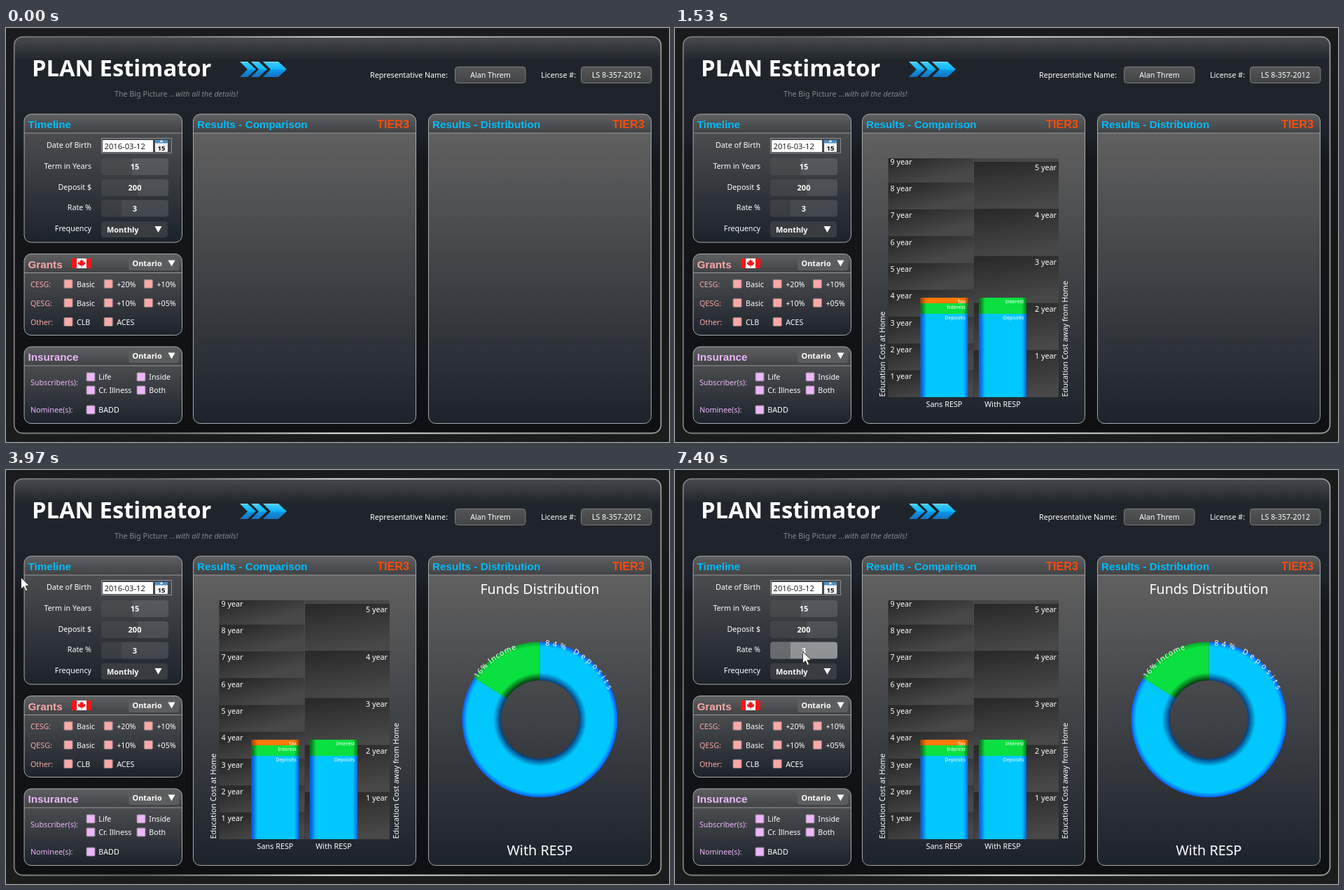
These frames come from a looping animation (947 by 591 pixels, 8 s). An HTML page with a canvas:

```html
<!DOCTYPE html>
<html lang="en">
<head>
<meta charset="utf-8">
<title>Plan estimator</title>
<style>
html, body { margin: 0; width: 100%; height: 100%; overflow: hidden; background: #191b1c; }
canvas { display: block; }
</style>
</head>
<body>
<canvas id="stage" width="947" height="591"></canvas>
<script>
const W = 947, H = 591, LOOP = 8000;
const SANS = '"Noto Sans", "Open Sans", sans-serif';
const HEAD = '"Liberation Sans", Arial, sans-serif';
const BLUE = '#00c8ff', GREEN = '#0ae040', ORANGE = '#ff7a00';
const PINK = '#fba8a8', LILAC = '#ecb6fb', CYAN = '#00bdfb';
let c;

const clamp = v => Math.max(0, Math.min(1, v));
const smooth = u => (u = clamp(u), u * u * (3 - 2 * u));
const lerp = (a, b, u) => a + (b - a) * u;
// The picture advances in short steps counted from a start time.
const held = (t, start, step) => start + Math.floor((t - start) / step) * step;

function layer(draw) {
  const canvas = document.createElement('canvas');
  canvas.width = W;
  canvas.height = H;
  c = canvas.getContext('2d');
  draw();
  return canvas;
}

function fade(gradient, stops) {
  stops.forEach(([at, color]) => gradient.addColorStop(at, color));
  return gradient;
}
const down = (y0, y1, ...stops) => fade(c.createLinearGradient(0, y0, 0, y1), stops);
const across = (x0, x1, ...stops) => fade(c.createLinearGradient(x0, 0, x1, 0), stops);

function text(str, x, y, { size = 10.7, color = '#fff', align = 'left', style = '', family = SANS } = {}) {
  c.font = `${style} ${size}px ${family}`;
  c.fillStyle = color;
  c.textAlign = align;
  c.fillText(str, x, y);
}

function box(x, y, w, h, fill, radius = 0, stroke, width = 1) {
  c.beginPath();
  c.roundRect(x, y, w, h, radius);
  if (fill) { c.fillStyle = fill; c.fill(); }
  if (stroke) { c.strokeStyle = stroke; c.lineWidth = width; c.stroke(); }
}

function poly(points, fill) {
  c.beginPath();
  points.forEach(([x, y]) => c.lineTo(x, y));
  c.closePath();
  c.fillStyle = fill;
  c.fill();
}

function panel(x, y, w, h, title, color, top = '#4a4c4f') {
  const split = y + 27;
  box(x, y, w, h, down(split, y + h, [0, top], [1, '#1d232b']), 10);
  c.save();
  c.clip();
  c.fillStyle = down(y, split, [0, '#5f6061'], [1, '#404244']);
  c.fillRect(x, y, w, 27);
  c.fillStyle = '#9a9a9a';
  c.fillRect(x, split - .5, w, 1);
  c.restore();
  box(x, y, w, h, null, 10, '#a9abac');
  text(title, x + 5.5, y + 20, { size: 15.25, color, style: 'bold', family: HEAD });
}

function dropdown(x, y, w, h, label, fill, labelX, arrowX) {
  box(x, y, w, h, fill, 4);
  const mid = y + h / 2;
  text(label, labelX, mid + 4, { style: 'bold', size: 10.9 });
  poly([[arrowX, mid - 4.5], [arrowX + 10, mid - 4.5], [arrowX + 5, mid + 4.5]], '#fff');
}

function check(x, y, label, color, gap = 18) {
  box(x, y, 12, 12, color, 1, '#8d8082');
  text(label, x + gap, y + 10.3);
}

function chevrons() {
  const fill = down(48, 70, [0, '#7fd8f7'], [.12, '#35c8fb'], [.5, '#10b4f5'], [.55, '#0a96e8'], [1, '#1a70bd']);
  [[334, 11], [350, 11], [367, 22]].forEach(([x, w]) =>
    poly([[x, 48], [x + w, 48], [x + w + 12, 59], [x + w, 70], [x, 70], [x + 11, 59]], fill));
}

function flag() {
  box(94, 329, 28, 14, '#f4161b');
  box(101, 329, 14, 14, '#fff');
  const half = [[0, -6], [1.4, -3.5], [3, -4], [2.6, -1], [5, -2], [5.4, .4], [2.4, 3], [.5, 3], [.5, 5.5]];
  const place = side => ([x, y]) => [108 + side * x, 336 + y];
  poly([...half.map(place(1)), ...half.map(place(-1)).reverse()], '#f4161b');
}

function drawPage() {
  c.fillStyle = down(0, H, [0, '#1a1b1c'], [.5, '#151617'], [1, '#1b1d1d']);
  c.fillRect(0, 0, W, H);
  box(11.7, 12.7, 923.8, 565.8,
    down(13, 579, [0, '#474a4d'], [.06, '#20252b'], [.24, '#1d222a'], [.31, '#15181c'], [1, '#0f1012']), 12,
    across(12, 936, [0, '#7c7e80'], [.2, '#6a6c6e'], [.5, '#f0f0f0'], [.75, '#b4b5b6'], [1, '#97999a']), 1.8);

  text('PLAN Estimator', 37, 69, { size: 32.7, style: 'bold' });
  chevrons();
  text('The Big Picture', 155, 98, { color: '#85888b' });
  text('...with all the details!', 234, 98, { color: '#85888b', style: 'italic' });
  text('Representative Name:', 631, 71, { align: 'right' });
  text('License #:', 814, 71, { align: 'right' });
  [[641.5, 'Alan Threm'], [821.5, 'LS 8-357-2012']].forEach(([x, label]) => {
    box(x, 55.5, 100.5, 23, down(55, 79, [0, '#555657'], [1, '#414344']), 4, '#7c7e7f');
    text(label, x + 50.5, 71, { align: 'center' });
  });

  panel(26, 123, 225.5, 183, 'Timeline', CYAN);
  ['Date of Birth', 'Term in Years', 'Deposit $', 'Rate %', 'Frequency'].forEach((label, i) =>
    text(label, 122, 171 + i * 29.75, { align: 'right' }));
  box(136.5, 157.5, 100, 21, null, 0, '#8e9193');
  box(138, 160, 72, 17, '#fff');
  text('2016-03-12', 140.5, 173, { size: 11.2, color: '#222' });
  box(213, 160, 18, 17, '#f4f4f4', 1);
  box(213, 160, 18, 4.5, '#4d8fc4', 1);
  box(220.5, 160.5, 3, 2.5, '#fff');
  text('15', 222, 174.5, { size: 9.5, color: '#111', style: 'bold', align: 'center' });
  dropdown(136, 276, 95, 23, 'Monthly', '#393c40', 144, 212.5);

  panel(26, 322.5, 225.5, 116, 'Grants', PINK);
  flag();
  dropdown(175, 326, 72, 20, 'Ontario', '#5c5d5e', 180.5, 231.5);
  const grants = [['CESG:', 'Basic', '+20%', '+10%'], ['QESG:', 'Basic', '+10%', '+05%'], ['Other:', 'CLB', 'ACES']];
  grants.forEach(([name, ...options], row) => {
    const y = 359.2 + row * 27.1;
    text(name, 35, y + 10.5, { color: PINK });
    options.forEach((label, i) => check(83 + i * 57.2, y, label, PINK));
  });

  panel(26, 455, 225.5, 109.5, 'Insurance', LILAC);
  dropdown(175, 458, 72, 20, 'Ontario', '#5c5d5e', 180.5, 231.5);
  text('Subscriber(s):', 35, 510, { color: LILAC });
  text('Nominee(s):', 35, 549, { color: LILAC });
  [['Life', 115, 492], ['Inside', 187, 492], ['Cr. Illness', 115, 511], ['Both', 187, 511], ['BADD', 115, 539]]
    .forEach(([label, x, y]) => check(x, y, label, LILAC, 17.3));

  [[267.5, 'Comparison'], [603.5, 'Distribution']].forEach(([x, name]) => {
    panel(x, 123, 318, 441.5, 'Results - ' + name, CYAN, '#606060');
    text('TIER3', x + 308.5, 143, { size: 16.2, color: '#f94c0c', style: 'bold', align: 'right', family: HEAD });
  });
}

function yearColumn(x, w, step, count, align) {
  const labelX = align === 'left' ? x + 3 : x + w - 3;
  for (let year = 0; year <= count; year++) {
    const bottom = 527 - year * step, top = Math.max(186, bottom - step);
    const shade = c.createLinearGradient(x + w * .35, bottom - step, x + w * .35 + 10, bottom);
    c.fillStyle = fade(shade, [[0, '#2a2a2a'], [.45, '#383838'], [1, '#484848']]);
    if (bottom > 186) c.fillRect(x, top, w, bottom - top);
  }
  for (let year = 1; year <= count; year++)
    text(year + ' year', labelX, 539.5 - year * step, { size: 10.8, align });
}

function bar(x, parts) {
  parts.forEach(([label, top, bottom, color, edge]) => {
    c.fillStyle = across(x, x + 68, [0, edge], [.03, edge], [.13, color], [.9, color], [1, edge]);
    c.fillRect(x, top, 68, bottom - top);
  });
  parts.forEach(([label, top]) => text(label, x + 64.5, top + 8, { size: 7.3, align: 'right' }));
}

function sideText(str, x) {
  c.save();
  c.translate(x, 526.5);
  c.rotate(-Math.PI / 2);
  text(str, 0, 0, { size: 10.8 });
  c.restore();
}

function drawComparison() {
  yearColumn(304.5, 122, 38.33, 9, 'left');
  yearColumn(427, 121, 67.25, 5, 'right');
  const deposits = ['Deposits', 408, 527, BLUE, '#0a62e0'];
  bar(350.5, [['Tax', 385, 393, ORANGE, '#b04a00'], ['Interest', 393, 408, GREEN, '#067a20'], deposits]);
  bar(434, [['Interest', 385, 408, GREEN, '#067a20'], deposits]);
  text('Sans RESP', 384.5, 541, { size: 10.8, align: 'center' });
  text('With RESP', 468, 541, { size: 10.8, align: 'center' });
  sideText('Education Cost at Home', 300);
  sideText('Education Cost away from Home', 560.5);
}

const CX = 762.5, CY = 356.3, INNER = 56, OUTER = 111;

function slice(from, to, color, innerEdge, outerEdge) {
  c.beginPath();
  c.arc(CX, CY, OUTER, from, to);
  c.arc(CX, CY, INNER, to, from, true);
  c.closePath();
  c.fillStyle = fade(c.createRadialGradient(CX, CY, INNER, CX, CY, OUTER),
    [[0, innerEdge], [.2, color], [.87, color], [1, outerEdge]]);
  c.fill();
}

function arcText(str, degrees, spacing) {
  const radius = 106;
  let angle = degrees * Math.PI / 180;
  c.font = `10.8px ${SANS}`;
  for (const ch of str) {
    const w = c.measureText(ch).width;
    c.save();
    c.translate(CX, CY);
    c.rotate(angle + w / 2 / radius);
    text(ch, 0, -radius, { size: 10.8, align: 'center' });
    c.restore();
    angle += (w + spacing) / radius;
  }
}

function drawDistribution() {
  const start = -Math.PI / 2, split = start - .16 * 2 * Math.PI;
  slice(start, split + 2 * Math.PI, BLUE, '#053f80', '#0a5cff');
  slice(split, start, GREEN, '#033c0c', '#07a428');
  arcText('16% Income', -56.5, .9);
  arcText('84% Deposits', 4, 4.3);
  text('Funds Distribution', CX, 177, { size: 19.6, align: 'center' });
  text('With RESP', CX, 550, { size: 19.8, align: 'center' });
}

function slider(y, split, value, hover) {
  box(136, y, 96, 24, `rgba(255,255,255,${.12 + .36 * hover})`, 4);
  c.save();
  c.clip();
  c.fillStyle = `rgba(20,22,24,${.2 + .12 * hover})`;
  c.fillRect(136, y, split - 136, 24);
  c.restore();
  text(value, 184, y + 16, { style: 'bold', size: 11, align: 'center' });
}

// Hover light that rises while the pointer is inside, then fades out.
const glow = (t, enter, leave) =>
  clamp((Math.min(t, leave) - enter) / 200) * (1 - clamp((t - leave) / 420));

function pointer(t) {
  if (t < 5270) {
    const u = smooth((held(t, 4420, 78) - 4342) / 858);
    return [lerp(21, 197, u), lerp(153, 160, u)];
  }
  if (t < 6690) {
    const u = smooth((held(t, 5270, 79) - 5200) / 940);
    return [lerp(197, 183, u), lerp(160, 283, u)];
  }
  const u = smooth((held(t, 6690, 78.8) - 6611) / 788);
  return [lerp(183, 182, u), lerp(283, 259, u)];
}

function drawPointer(x, y, alpha) {
  const shape = [[0, 0], [0, 16.5], [3.8, 13], [6.6, 19.3], [9.2, 18], [6.5, 12], [11.8, 11.7]];
  c.globalAlpha = alpha;
  poly(shape.map(([dx, dy]) => [x + dx + .5, y + dy + .5]), '#fff');
  c.strokeStyle = '#1a1a1a';
  c.lineWidth = .8;
  c.stroke();
  c.globalAlpha = 1;
}

const page = layer(drawPage);
const comparison = layer(drawComparison);
const distribution = layer(drawDistribution);
const screen = document.getElementById('stage').getContext('2d');

function show(image, alpha) {
  c.globalAlpha = alpha;
  c.drawImage(image, 0, 0);
  c.globalAlpha = 1;
}

function render(t) {
  c = screen;
  show(page, 1);
  slider(186, 180, '15', glow(t, 5470, 5610));
  slider(216, 188, '200', glow(t, 5642, 5767));
  slider(245.5, 165, '3', Math.max(glow(t, 5797, 5945), glow(t, 7050, LOOP)));
  if (t >= 1010) show(comparison, clamp((held(t, 1010, 72.5) - 940) / 530));
  if (t >= 2960) show(distribution, clamp((held(t, 2960, 74) - 2900) / 590));
  if (t >= 3810) drawPointer(...pointer(t), clamp((held(t, 3810, 80) - 3730) / 240));
}

function tick() {
  render(performance.now() % LOOP);
  requestAnimationFrame(tick);
}
tick();
</script>
</body>
</html>
```
